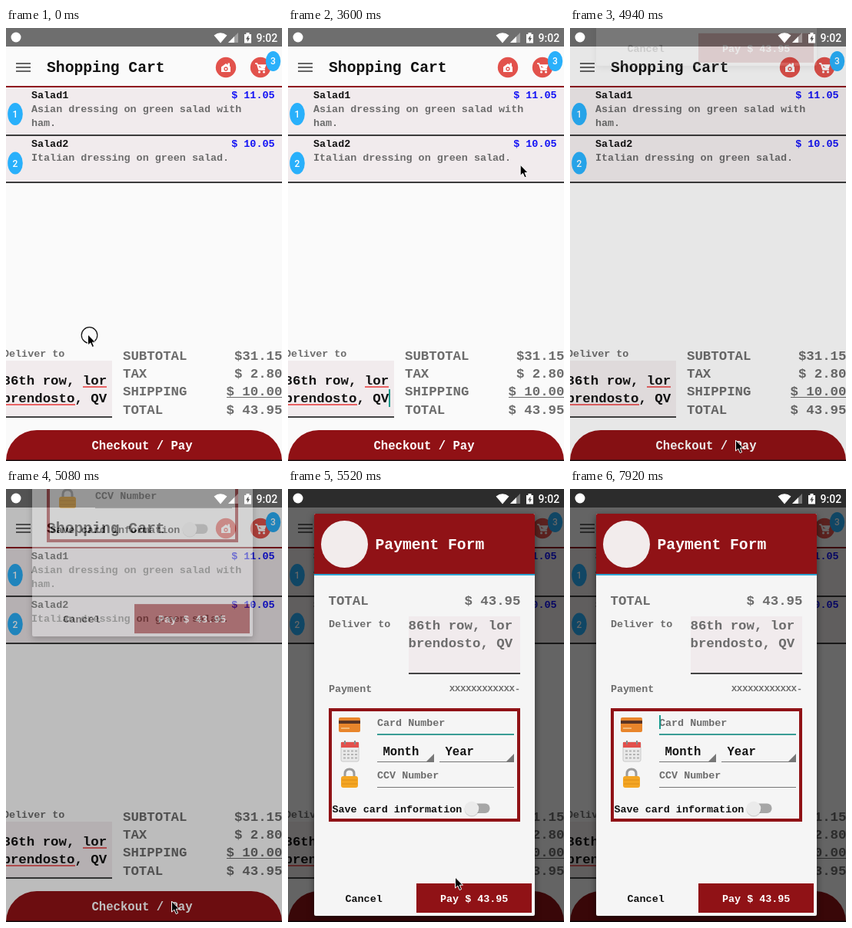
An HTML page for the animation above (8000 ms loop, 359 px wide and 561 px high).

```html
<!DOCTYPE html>
<html lang="en">
<head>
<meta charset="utf-8">
<title>Shopping cart checkout</title>
<style>
html, body { margin: 0; width: 100%; height: 100%; overflow: hidden; background: #fafafa; }
svg { display: block; }
text { font: bold 13.4px "Liberation Mono", monospace; fill: #111; white-space: pre; }
.m { font-size: 15.6px; }
.l { font-size: 17.4px; }
.xl { font-size: 19.7px; }
.s { font-size: 11.8px; }
.grey { fill: #6c6c6c; }
.blue { fill: #1212f5; }
.white { fill: #fff; }
.end { text-anchor: end; }
.ui { font: 500 14px Roboto, sans-serif; fill: #fff; }
.num { font: 500 12px Roboto, sans-serif; fill: #fff; text-anchor: middle; }
.panel { filter: drop-shadow(0 3px 4px rgba(0, 0, 0, .5)); }
</style>
</head>
<body>
<svg width="359" height="561" viewBox="0 0 359 561">
  <!-- cart screen -->
  <rect width="359" height="561" fill="#fafafa"/>
  <rect width="359" height="24" fill="#6e6e6e"/>
  <path d="M13 46H32M13 51H32M13 56H32" stroke="#666" stroke-width="2"/>
  <text class="xl" x="53" y="57">Shopping Cart</text>
  <g fill="#e2524c"><circle cx="286" cy="51" r="13.2"/><circle cx="331" cy="51" r="13.2"/></g>
  <path d="M280 50.500L286 46L288.500 47.800V45.500H291V49.500L292 50.500V57H280Z" fill="#fff"/>
  <circle cx="286" cy="53" r="2" fill="none" stroke="#e2524c" stroke-width="1.300"/>
  <path d="M324 46H326.500L329 54H337M327.500 48H337.500L336 52H329Z" fill="#fff" stroke="#fff" stroke-width="1.500"/>
  <g fill="#fff"><circle cx="329.500" cy="57" r="1.500"/><circle cx="335.500" cy="57" r="1.500"/></g>
  <ellipse cx="347.500" cy="43" rx="9.700" ry="13" fill="#29b0fb"/>
  <text class="num" x="347.500" y="47">3</text>

  <path d="M0 77H359V200H0Z" fill="#f1ebed"/>
  <path d="M0 76H359" stroke="#901a20" stroke-width="2"/>
  <path d="M0 139H359M0 200H359" stroke="#3c3c3c" stroke-width="2"/>
  <g fill="#29b0fb"><ellipse cx="12" cy="111.500" rx="9.800" ry="14.500"/><ellipse cx="12" cy="175" rx="9.800" ry="14.500"/></g>
  <text class="num" x="12" y="116">1</text>
  <text class="num" x="12" y="179.500">2</text>
  <text x="33" y="91">Salad1</text>
  <text class="blue end" x="349.500" y="91">$ 11.05</text>
  <text class="grey" x="33" y="109">Asian dressing on green salad with</text>
  <text class="grey" x="33" y="127">ham.</text>
  <text x="33" y="154">Salad2</text>
  <text class="blue end" x="349.500" y="154">$ 10.05</text>
  <text class="grey" x="33" y="172">Italian dressing on green salad.</text>

  <text class="grey" x="-4" y="426">Deliver to</text>
  <rect y="431" width="138" height="74" fill="#f1ebed"/>
  <path d="M0 504H138" stroke="#444" stroke-width="2"/>
  <text class="l" x="-4.500" y="462">86th row, lor</text>
  <text class="l" x="-4.500" y="485">brendosto, QV</text>
  <path d="M100 465H131M0 488H90" stroke="#e8383a" stroke-width="1.600"/>
  <rect id="caret" x="131" y="468" width="2" height="23" fill="#1b9a8d"/>
  <g id="sums"></g>
  <path d="M287 478.500H359" stroke="#6c6c6c"/>

  <path id="checkout" d="M0 561A40 40 0 0 1 40 521H319A40 40 0 0 1 359 561Z" fill="#901115"/>
  <rect y="559.500" width="359" height="1.500" fill="#181012"/>
  <text class="m white" x="111.500" y="546">Checkout / Pay</text>

  <rect id="dim" width="359" height="561"/>

  <!-- payment form -->
  <g id="form">
    <rect class="panel" x="34" y="32" width="287" height="521" rx="2" fill="#f5f5f5"/>
    <path d="M34 110V34Q34 32 36 32H319Q321 32 321 34V110Z" fill="#901216"/>
    <path d="M34 111H321" stroke="#2ea5d2" stroke-width="2"/>
    <circle cx="73.500" cy="71.500" r="30.500" fill="#f2ecec"/>
    <text class="xl white" x="113.500" y="78">Payment Form</text>
    <text class="l grey" x="52.500" y="150">TOTAL</text>
    <text class="l grey end" x="302.500" y="150">$ 43.95</text>
    <text class="grey" x="53" y="178.500">Deliver to</text>
    <rect x="157" y="165" width="145" height="75" fill="#f1ebed"/>
    <path d="M157 239H302" stroke="#444" stroke-width="2"/>
    <text class="l grey" x="156.500" y="182">86th row, lor</text>
    <text class="l grey" x="156.500" y="204.500">brendosto, QV</text>
    <text class="grey" x="53" y="263">Payment</text>
    <text class="s grey end" x="302" y="262">XXXXXXXXXXXX-</text>
    <rect x="55" y="286" width="245" height="143" fill="none" stroke="#901216" stroke-width="4"/>

    <rect x="66" y="296" width="28" height="19" rx="2" fill="#e8852b"/>
    <path d="M66 302H94" stroke="#5a3424" stroke-width="4"/>
    <path d="M69 310H80" stroke="#f3b877" stroke-width="2"/>

    <rect x="69" y="328" width="23" height="25" rx="2" fill="#e9e9e9" stroke="#c8c8c8"/>
    <path d="M69 328H92V335H69Z" fill="#e2504c"/>
    <path d="M74 326V331M87 326V331" stroke="#888" stroke-width="2"/>
    <path d="M72 339.500H90M72 344H90M72 348.500H90" stroke="#b4b4b4" stroke-width="2" stroke-dasharray="3 2"/>

    <path d="M74 375V369Q74 363 80 363T86 369V375" fill="none" stroke="#9b9b9b" stroke-width="3"/>
    <rect x="69" y="372" width="22" height="15" rx="3" fill="#f4a623"/>
    <path d="M70 377H90M70 382H90" stroke="#dd8d16"/>

    <text class="grey" x="116" y="306.500">Card Number</text>
    <path d="M116 318H294" stroke="#3a9d95" stroke-width="2"/>
    <rect id="formCaret" x="116" y="293" width="2" height="18" fill="#1b9a8d"/>
    <text class="m" x="123.500" y="345">Month</text>
    <text class="m" x="204.500" y="345">Year</text>
    <path d="M116 353.500H190M197 353.500H294M116 386.500H294" stroke="#777"/>
    <path d="M179 354L190 343V354ZM283 354L294 343V354Z" fill="#777"/>
    <text class="grey" x="116" y="375">CCV Number</text>
    <text x="57.500" y="418.500">Save card information</text>
    <rect x="236" y="407.500" width="26.500" height="12.500" rx="6" fill="#a6a6a6"/>
    <circle cx="239" cy="415" r="9.500" opacity=".15"/>
    <circle cx="239" cy="414" r="9.300" fill="#ebebeb"/>
    <text x="74.500" y="535">Cancel</text>
    <rect x="167" y="511" width="150" height="38" fill="#901216"/>
    <text class="white" x="198" y="535">Pay $ 43.95</text>
  </g>

  <!-- status icons -->
  <g fill="#fff">
    <circle cx="13" cy="12" r="6.500"/>
    <path d="M270.500 9.500Q279 3 287.500 9.500L279 19.500Z"/>
    <path d="M289 19L302 6V19Z" opacity=".35"/>
    <path d="M289 19L297 11V19Z"/>
    <path d="M310 8H312.500V6H316.500V8H319V19.500H310Z"/>
  </g>
  <path d="M315.500 9.500L312 14.500H314V18L317 13H315.300Z" fill="#555"/>
  <text class="ui" x="325.500" y="18">9:02</text>

  <g id="pointer">
    <circle id="touch" cx="2.500" cy="1" r="10.300" fill="none" stroke="#111" stroke-width="1.200"/>
    <path d="M.5 0V14L3.800 11L6.200 16.500L8.600 15.500L6.300 10.200H10.500Z" fill="#000" stroke="#fff"/>
  </g>
</svg>
<script>
const $ = id => document.getElementById(id);
const show = (id, on) => $(id).setAttribute("visibility", on ? "visible" : "hidden");
const move = (id, value) => $(id).setAttribute("transform", value);

const sums = [["SUBTOTAL", "$31.15"], ["TAX", "$ 2.80"], ["SHIPPING", "$ 10.00"], ["TOTAL", "$ 43.95"]];
$("sums").innerHTML = sums.map(([label, sum], i) => {
  const y = 430 + i * 23.2;
  return `<text class="l grey" x="152" y="${y}">${label}</text>
    <text class="l grey end" x="359.5" y="${y}">${sum}</text>`;
}).join("");

// BLINK is counted in ticks
const LOOP = 8000, TICK = 149.1, BLINK = 3.5;

// Pointer stops: tick, x, y
const path = [
  [0, 106, 397], [2, 85, 440], [5, 108, 499], [6, 108, 499], [8, 112, 515], [9, 112, 515],
  [10, 100, 500], [13, 333, 131], [15, 279, 420], [16, 279, 420], [17, 290, 492],
  [20, 334, 180], [21, 330, 70], [23, 319, 106], [29, 215, 534], [36, 215, 534],
  [37, 217, 503], [38, 233, 337], [42, 190, 247], [45, 158, 307], [99, 158, 307]
];

function pointerAt(tick) {
  const i = path.findIndex(stop => stop[0] > tick);
  const [t0, x0, y0] = path[i - 1], [t1, x1, y1] = path[i];
  const k = (tick - t0) / (t1 - t0);
  return [x0 + (x1 - x0) * k, y0 + (y1 - y0) * k];
}

function draw(time) {
  // The screen refreshes in even steps
  const tick = Math.floor(time % LOOP / TICK);

  const u = Math.min(1, Math.max(0, (tick - 32.57) * 0.26));
  const fade = Math.min(1, u * 1.12);
  move("form", `translate(0 ${-260 * (1 + Math.cos(Math.PI * u))})`);
  $("form").setAttribute("opacity", fade);
  $("dim").setAttribute("opacity", fade * 0.6);

  const pressed = tick === 31 || tick === 32;
  move("checkout", pressed ? "translate(0 108.2) scale(.99 .8)" : "");

  show("caret", tick > 0 && tick < 33 && Math.floor(tick / BLINK) % 2 === 0);
  show("formCaret", Math.floor((tick - 35.5) / BLINK) & 1);

  move("pointer", `translate(${pointerAt(tick)})`);
  show("pointer", tick < 49);
  show("touch", tick === 0);
}

const start = performance.now();
function frame() {
  draw(performance.now() - start);
  requestAnimationFrame(frame);
}
frame();
</script>
</body>
</html>
```
